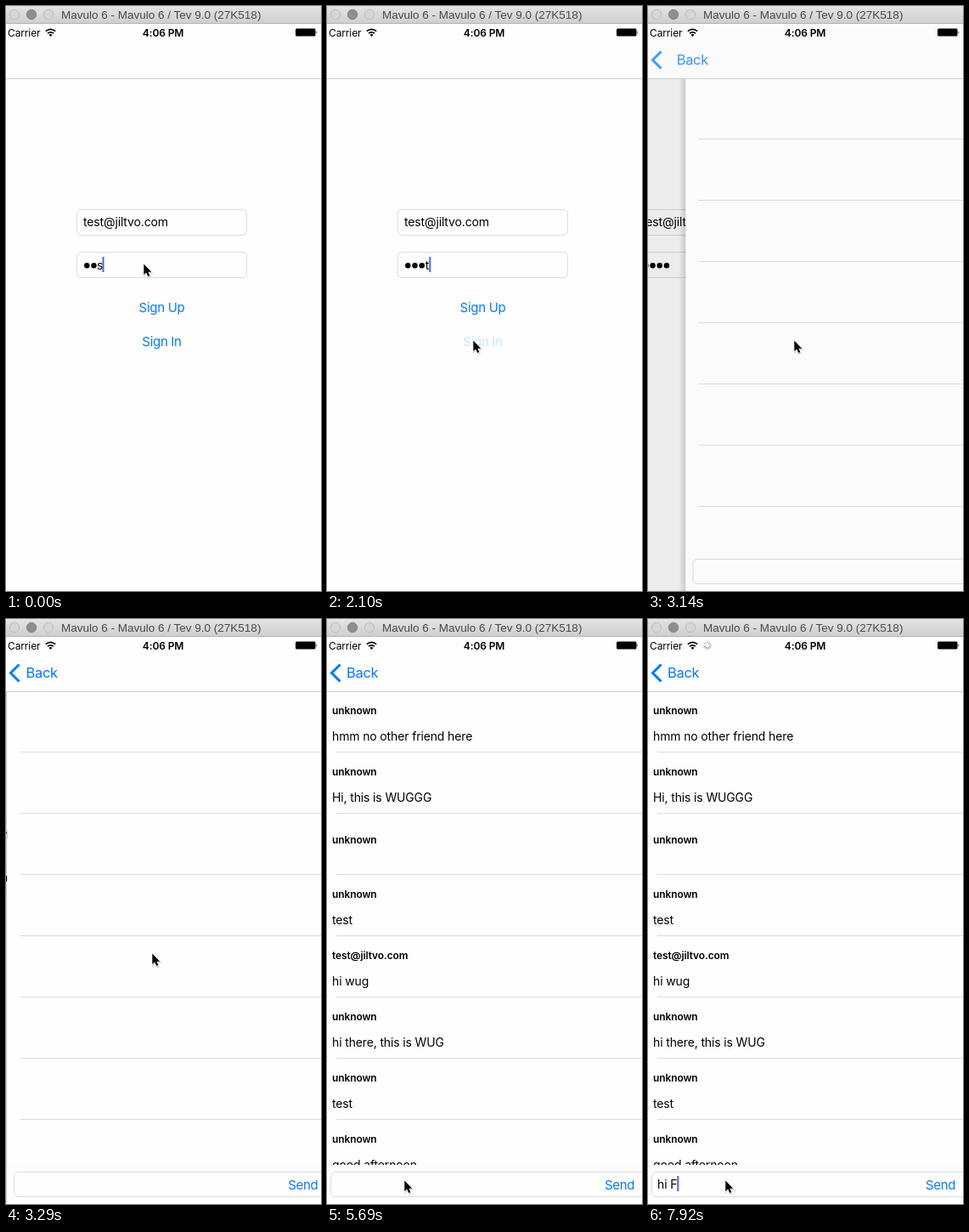
Recreate the animation shown at these times as an HTML page. Size 371 px wide and 688 px high, loop 8000 ms.

```html
<!DOCTYPE html>
<html lang="en">
<head>
<meta charset="utf-8">
<title>Chat sign-in</title>
<style>
  html, body { margin: 0; width: 100%; height: 100%; overflow: hidden; background: #fefefe; }
  svg { display: block; width: 371px; height: 688px; }
  text { font: 14px Inter, sans-serif; letter-spacing: -.01em; white-space: pre; fill: #000; }
  .title { font: 13.5px "Liberation Sans", Arial, sans-serif; letter-spacing: 0; fill: #4a4a4a; }
  .status { font-size: 12px; }
  .bold { font-size: 12px; font-weight: 600; }
  .link { font-size: 15px; letter-spacing: -.02em; fill: #007aff; }
  .back { font-size: 16.5px; letter-spacing: -.02em; fill: #007aff; }
  .mid { text-anchor: middle; }
  .field { fill: #fefefe; stroke: #dcdcdc; }
  .caret { fill: #4a66e0; }
</style>
</head>
<body>
<svg viewBox="0 0 371 688">
  <defs>
    <linearGradient id="bar" x2="0" y2="1">
      <stop stop-color="#e4e4e4"/><stop offset="1" stop-color="#cecece"/>
    </linearGradient>
    <linearGradient id="edge">
      <stop stop-opacity="0"/><stop offset="1" stop-opacity=".16"/>
    </linearGradient>
    <clipPath id="list"><rect y="86" width="375" height="556"/></clipPath>
    <path id="arrow" d="M0 0V14.3L3.3 11.3L5.6 16.4L8 15.4L5.8 10.4H10.2Z"/>
  </defs>

  <g id="login">
    <rect width="600" height="688" fill="#fefefe"/>
    <rect class="field" x="83.5" y="239.5" width="200" height="30" rx="5"/>
    <rect class="field" x="83.5" y="289.5" width="200" height="30" rx="5"/>
    <text x="91" y="259">test@jiltvo.com</text>
    <g id="dots"></g>
    <text id="last" y="310"></text>
    <rect id="passCaret" class="caret" y="295" width="2" height="18"/>
    <text class="link mid" x="183.5" y="360">Sign Up</text>
    <text id="signIn" class="link mid" x="183.5" y="400">Sign In</text>
  </g>
  <rect id="dim" width="371" height="688"/>

  <g id="chat">
    <rect x="-8" y="86" width="8" height="602" fill="url(#edge)"/>
    <rect width="375" height="688" fill="#fefefe"/>
    <g id="lines" stroke="#dedede"></g>
    <g id="rows" clip-path="url(#list)"></g>
    <rect y="642" width="375" height="46" fill="#fdfdfd"/>
    <rect class="field" x="8.5" y="650.5" width="400" height="29" rx="5"/>
    <text id="typed" x="15" y="669.5"></text>
    <rect id="chatCaret" class="caret" y="655" width="2" height="18"/>
    <text class="link" x="331" y="670.5">Send</text>
  </g>

  <rect y="21" width="371" height="64" fill="#fefefe"/>
  <rect id="veil" y="21" width="371" height="667"/>
  <path d="M0 85.5H371" stroke="#cfcfcf"/>
  <path id="chevron" d="M15.5 53.5L5.5 63.5L15.5 73.5" fill="none" stroke="#007aff" stroke-width="3"/>
  <text id="back" class="back" y="69">Back</text>

  <text class="status" x="2" y="35.5">Carrier</text>
  <g fill="none" stroke="#000" stroke-width="1.7">
    <path d="M46.8 29.6Q52.5 25 58.2 29.6M49 32.2Q52.5 29.4 56 32.2"/>
    <path d="M50.4 33.8Q52.5 32.4 54.6 33.8L52.5 36Z" fill="#000" stroke="none"/>
  </g>
  <g id="spinner" stroke="#555" stroke-linecap="round"></g>
  <text class="bold mid" x="185" y="35.5">4:06 PM</text>
  <rect x="341" y="26.5" width="23.5" height="9" rx="1.5"/>
  <path d="M365.5 29.3Q367.3 31 365.5 32.7Z"/>

  <rect width="371" height="20.5" fill="url(#bar)"/>
  <path d="M0 20.5H371" stroke="#b4b4b4"/>
  <g fill="#d6d6d6" stroke="#bdbdbd">
    <circle cx="10" cy="10" r="5.7"/>
    <circle cx="30" cy="10" r="5.7" fill="#8e8e8e" stroke="#868686"/>
    <circle cx="50" cy="10" r="5.7"/>
  </g>
  <text class="title" x="65" y="15">Mavulo 6 - Mavulo 6 / Tev 9.0 (27K518)</text>

  <g id="pointer">
    <g transform="translate(.3 .5) scale(.88)">
      <use href="#arrow" x=".6" y="1.2" opacity=".22" stroke="#000" stroke-width="1.6"/>
      <use href="#arrow" stroke="#fff" stroke-width="1.6" paint-order="stroke"/>
    </g>
  </g>
</svg>
<script>
const LOOP = 8000, WIDTH = 371, PAGE = 375;
const $ = id => document.getElementById(id);
const put = (el, attrs) => { for (const k in attrs) el.setAttribute(k, attrs[k]); };
const within = (t, spans) => spans.some(([a, b]) => t >= a && t < b);

// Screen refresh times: [start, count], 150 ms apart within a run.
const ticks = [[0, 1], [450, 1], [900, 7], [2100, 7], [3140, 4], [4040, 7],
  [5090, 5], [5990, 3], [6730, 6], [7620, 2], [7920, 1]]
  .flatMap(([start, n]) => Array.from({ length: n }, (_, i) => start + i * 150));

const pointerPath = [[750, 162, 303], [1650, 172, 393], [4040, 172, 393],
  [4490, 174, 356], [4790, 177, 358], [5690, 91, 660]];
const spinning = [[2250, 3140], [4040, 4340], [5090, 5390], [5990, 6290], [6880, 7180], [7920, LOOP]];
const typing = [[0, ''], [6730, 'h'], [7030, 'hi'], [7480, 'hi '], [7920, 'hi F']];

const messages = [
  ['unknown', 'hmm no other friend here'],
  ['unknown', 'Hi, this is WUGGG'],
  ['unknown', ''],
  ['unknown', 'test'],
  ['test@jiltvo.com', 'hi wug'],
  ['unknown', 'hi there, this is WUG'],
  ['unknown', 'test'],
  ['unknown', 'good afternoon']
];

$('rows').innerHTML = messages.map(([who, msg], i) => {
  const y = 111.5 + i * 72;
  return `<text class="bold" x="10" y="${msg ? y : y + 8.5}">${who}</text>` +
    `<text x="10" y="${y + 31.5}">${msg}</text>`;
}).join('');
$('lines').innerHTML = messages.slice(1)
  .map((_, i) => `<path d="M15 ${156.5 + i * 72}H${PAGE}"/>`).join('');
$('dots').innerHTML = [0, 1, 2, 3]
  .map(i => `<circle cx="${95.3 + i * 8.2}" cy="305.3" r="3.2"/>`).join('');
$('spinner').innerHTML = Array.from({ length: 12 }, (_, i) =>
  `<path d="M0 -2.6V-4.6" transform="rotate(${i * 30})" opacity="${.2 + i * .04}"/>`).join('');

function pointerAt(t) {
  const next = pointerPath.findIndex(p => p[0] > t);
  if (next === 0) return pointerPath[0].slice(1);
  if (next < 0) return pointerPath.at(-1).slice(1);
  const [t0, x0, y0] = pointerPath[next - 1], [t1, x1, y1] = pointerPath[next];
  const u = (t - t0) / (t1 - t0), e = u * u * (3 - 2 * u);
  return [x0 + (x1 - x0) * e, y0 + (y1 - y0) * e];
}

// Critically damped spring for the page push.
function pushAt(t) {
  if (t < 2942) return 0;
  if (t >= 3590) return 1;
  const u = (t - 2942) * .018;
  return 1 - (1 + u) * Math.exp(-u);
}

function drawLogin(t, p) {
  const shown = t < 450 ? 2 : t < 2400 ? 3 : 4;
  [...$('dots').children].forEach((d, i) => put(d, { opacity: i < shown ? 1 : 0 }));
  $('last').textContent = ['s', 't', ''][shown - 2];
  put($('last'), { x: shown === 2 ? 107 : 115.7 });
  put($('passCaret'), {
    x: t < 450 ? 113.5 : shown === 3 ? 120.3 : 124,
    opacity: within(t, [[1200, 1650], [2700, LOOP]]) ? 0 : 1
  });
  put($('signIn'), { opacity: within(t, [[2100, 2400]]) ? .2 : 1 });
  put($('login'), { transform: `translate(${-.3 * PAGE * p})` });
  put($('dim'), { opacity: .08 * p * p });
}

function drawChat(t, p) {
  put($('chat'), { transform: `translate(${WIDTH - PAGE * p})`, visibility: p ? 'visible' : 'hidden' });
  put($('rows'), { opacity: t >= 4190 ? 1 : 0 });
  const text = typing.findLast(([at]) => t >= at)[1];
  $('typed').textContent = text;
  put($('chatCaret'), {
    x: 15 + (text ? $('typed').getComputedTextLength() : 0),
    opacity: t >= 5990 ? 1 : 0
  });
  put($('veil'), { opacity: .11 * p * (1 - p) });
  put($('back'), { x: 23 + 153 * (1 - p) ** 1.3, opacity: Math.min(1, p * .8 + p ** 8 * .25) });
  put($('chevron'), { opacity: Math.max(0, p * 2 - 1) });
}

function draw(now) {
  const t = ticks.findLast(at => at <= now);
  const p = pushAt(t);
  drawLogin(t, p);
  drawChat(t, p);
  put($('spinner'), {
    transform: `translate(70 31) rotate(${Math.floor(t / 75) * 30})`,
    opacity: within(t, spinning) ? 1 : 0
  });
  put($('pointer'), { transform: `translate(${pointerAt(t)})` });
}

const begun = performance.now();
function loop() {
  draw((performance.now() - begun) % LOOP);
  requestAnimationFrame(loop);
}
loop();
</script>
</body>
</html>
```
